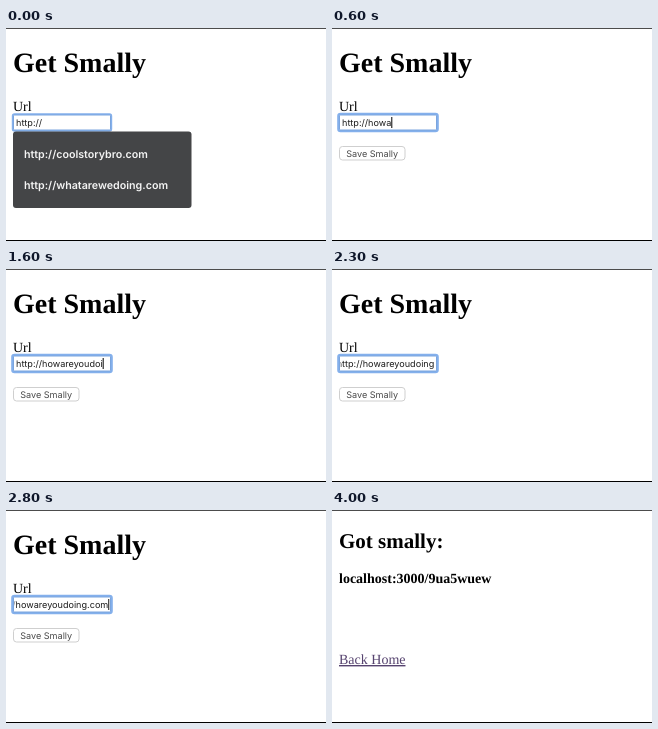
An HTML page that plays this animation: 320 by 213 pixels, repeating every 5.3 s.

```html
<!DOCTYPE html>
<html lang="en">
<head>
<meta charset="utf-8">
<title>Link shortener demo</title>
<style>
  html, body { margin: 0; width: 100%; height: 100%; overflow: hidden; background: #fff; }
  svg { display: block; width: 100%; height: 100%; }
  text {
    font-family: "Liberation Serif", "Times New Roman", serif; font-size: 14px;
    text-rendering: geometricPrecision;
  }
  .bold { font-weight: bold; }
  .ui { font-family: Inter, Roboto, sans-serif; font-size: 9.1px; }
  #popup text { font-size: 10.7px; font-weight: 600; fill: #f4f4f4; }
</style>
</head>
<body>
<svg viewBox="0 0 320 213">
  <defs>
    <clipPath id="field"><rect x="8.5" y="88" width="95.2" height="13"/></clipPath>
    <filter id="soft" x="-10%" y="-50%" width="120%" height="200%">
      <feGaussianBlur stdDeviation=".7"/>
    </filter>
  </defs>
  <rect width="320" height="213" fill="#fff"/>

  <g id="form">
    <text class="bold" x="7" y="44" style="font-size:28px">Get Smally</text>
    <text x="7" y="83">Url</text>

    <rect id="glow" x="7" y="86.5" width="98" height="16" rx="1.5" fill="none" stroke="#84b0ec" filter="url(#soft)"/>
    <rect x="7.5" y="87" width="97" height="15" rx=".5" fill="#fff" stroke="#7ba5de"/>
    <g clip-path="url(#field)">
      <text id="value" class="ui" y="98" fill="#1c1c1c"></text>
      <rect id="caret" y="89" width="1" height="11"/>
    </g>

    <g id="button">
      <rect x="7.5" y="118.5" width="65.5" height="13.5" rx="3" fill="#fff" stroke="#cfcfcf"/>
      <text class="ui" x="40.2" y="128.5" text-anchor="middle" fill="#4a4a4a">Save Smally</text>
    </g>

    <g id="popup">
      <rect x="7" y="103.5" width="178.5" height="76.5" rx="3" fill="#444547"/>
      <text class="ui" x="18" y="130">http://coolstorybro.com</text>
      <text class="ui" x="18" y="161">http://whatarewedoing.com</text>
    </g>
  </g>

  <g id="result">
    <text class="bold" x="7" y="38" style="font-size:21px">Got smally:</text>
    <text class="bold" x="7" y="73">localhost:3000/9ua5wuew</text>
    <text x="7" y="154" fill="#56436f" text-decoration="underline">Back Home</text>
  </g>

  <path d="M0 .5H320" stroke="#4c4c4c"/>
  <path d="M0 212.5H320" stroke="#000"/>
</svg>
<script>
  const LOOP = 5300, SUBMIT = 3500, LOADED = 3700, BLINK = 500;
  const TEXT_LEFT = 10, TEXT_RIGHT = 102.3;

  // [time in ms, keys typed at that moment]
  const keys = [
    [100, "h"], [200, "o"], [300, "w"], [600, "a"], [800, "r"], [900, "e"],
    [1000, "y"], [1100, "o"], [1200, "u"], [1500, "d"], [1600, "oi"],
    [1700, "ng"], [2400, "."], [2500, "c"], [2600, "o"], [2800, "m"]
  ];

  const el = id => document.getElementById(id);
  const show = (id, on) => el(id).setAttribute("visibility", on ? "visible" : "hidden");

  function drawField(t) {
    const typed = keys.filter(([time]) => time <= t);
    const value = el("value");
    value.textContent = "http://" + typed.map(([, key]) => key).join("");

    // Long text scrolls left so that its end stays in view.
    const width = value.getComputedTextLength();
    const left = Math.min(TEXT_LEFT, TEXT_RIGHT - width);
    value.setAttribute("x", left);
    el("caret").setAttribute("x", left + width);

    const idle = typed.length ? t - typed[typed.length - 1][0] : BLINK;
    const caretOn = Math.floor(idle / BLINK) % 2 === 0;
    el("caret").setAttribute("opacity", caretOn && t < SUBMIT ? 1 : 0);
    el("glow").setAttribute("stroke-width", t < 100 ? 2.4 : 3.6);
  }

  function frame(now) {
    const t = now % LOOP;
    const loaded = t >= LOADED;
    el("form").setAttribute("display", loaded ? "none" : "inline");
    show("result", loaded);
    show("popup", t < 100);
    el("button").setAttribute("opacity", t < SUBMIT ? 1 : 0.35);
    if (!loaded) drawField(t);
  }

  const start = performance.now();
  function tick() {
    frame(performance.now() - start);
    requestAnimationFrame(tick);
  }
  tick();
</script>
</body>
</html>
```
